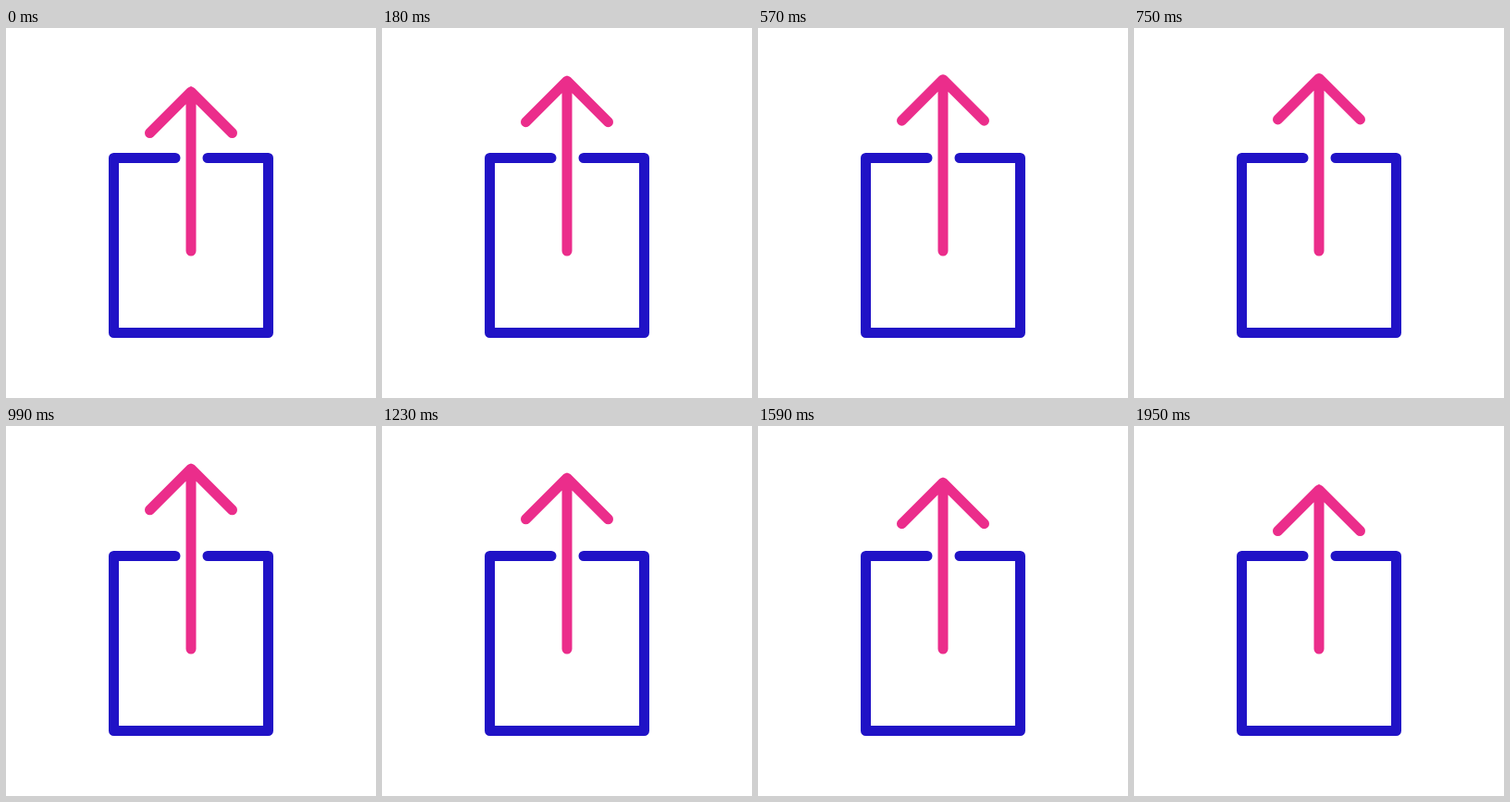
Write an HTML page that moves like this. It is 400x400 px and loops after 4660 ms.

```html
<!DOCTYPE html>
<html lang="en">
<head>
<meta charset="utf-8">
<title>Share icon</title>
<style>
  html, body { margin: 0; width: 100%; height: 100%; overflow: hidden; background: #fff; }
  svg { display: block; width: 100%; height: 100%; }
  path { fill: none; stroke-width: 11; stroke-linecap: round; stroke-linejoin: round; }
  .box { stroke: #2012c6; }
  .arrow { stroke: #eb2d8b; }
</style>
</head>
<body>
<svg viewBox="0 0 400 400">
  <path class="box" d="M183 140.5H116.5V329.5H283.5V140.5H218"/>
  <path class="arrow" id="arrow"/>
</svg>
<script>
  const LOOP = 4660, STEP = 30;
  const TIP = 69, TAIL = 241, WING = 44.5;

  // [time in ms, lift in px]
  const KEYS = [
    [0, 0], [405, 28.5], [655, 8], [902, 28.5],
    [1150, 8], [1400, 28.5], [1750, -8], [1950, 0]
  ];

  const arrow = document.getElementById('arrow');
  const ease = p => (1 - Math.cos(Math.PI * p)) / 2;

  function liftAt(t) {
    const i = KEYS.findIndex(k => k[0] > t);
    if (i < 0) return 0;
    const [t0, a] = KEYS[i - 1], [t1, b] = KEYS[i];
    return a + (b - a) * ease((t - t0) / (t1 - t0));
  }

  function draw(ms) {
    const t = Math.floor((ms % LOOP) / STEP) * STEP;
    const y = TIP - liftAt(t);
    arrow.setAttribute('d',
      `M200 ${TAIL}V${y}M${200 - WING} ${y + WING}L200 ${y}L${200 + WING} ${y + WING}`);
  }

  let start;
  function tick(now) {
    start ??= now;
    draw(now - start);
    requestAnimationFrame(tick);
  }
  draw(0);
  requestAnimationFrame(tick);
</script>
</body>
</html>
```
